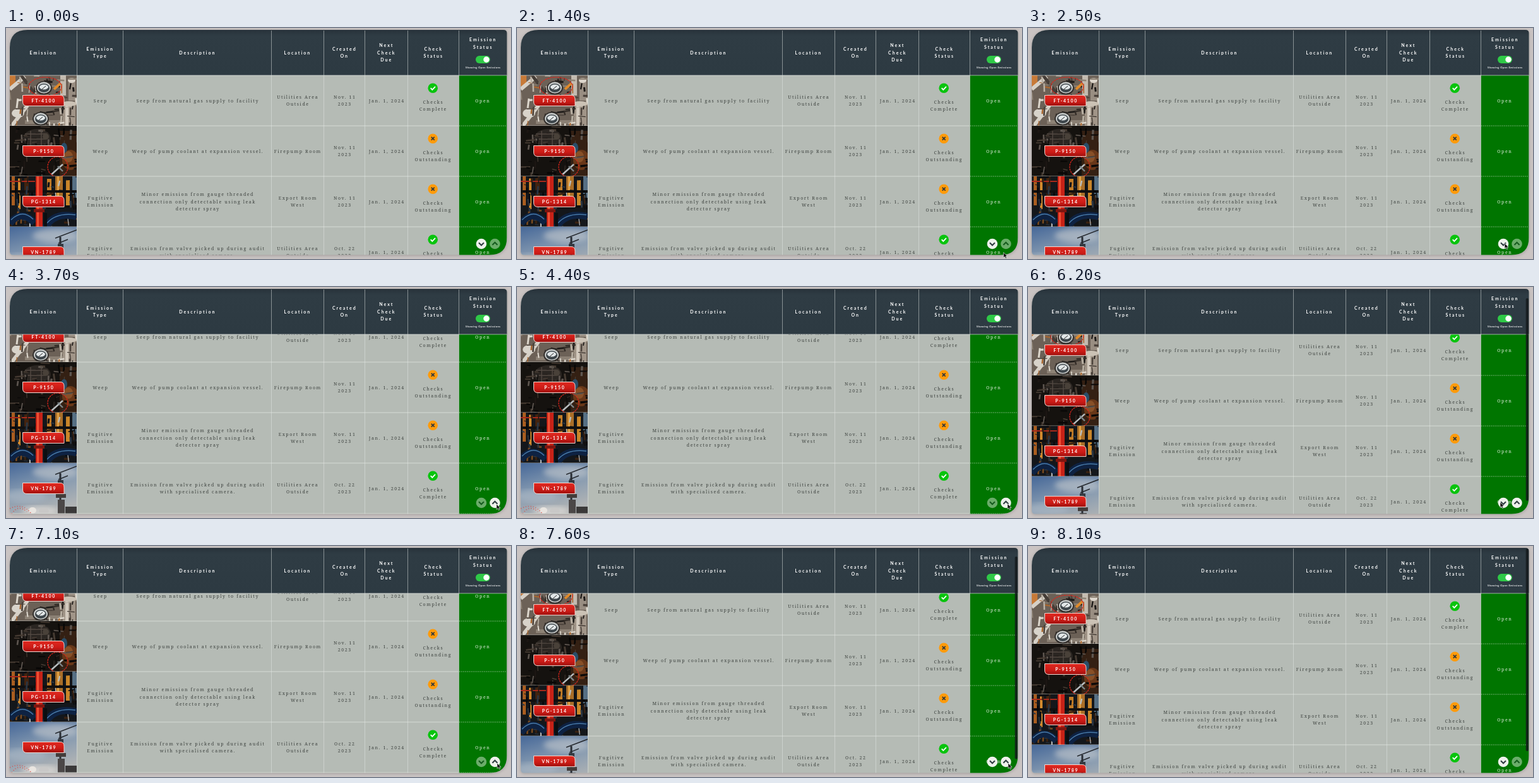
An HTML page for the animation above (8200 ms loop, 800 by 366 pixels).

```html
<!DOCTYPE html>
<html lang="en">
<head>
<meta charset="utf-8">
<title>Emissions table</title>
<style>
html, body { margin: 0; width: 100%; height: 100%; overflow: hidden; background: #cac4c3; }
svg { display: block; width: 100vw; height: 100vh; }
text { text-anchor: middle; }
.head { font: 700 7px Lato, sans-serif; letter-spacing: 2px; fill: #fff; }
.hint { font: 700 4px Lato, sans-serif; letter-spacing: .5px; fill: #fff; }
.cell { font: 7px "Noto Serif", serif; letter-spacing: 1.6px; fill: #3d423f; }
.open { fill: #e3efe0; }
.tag { font: 700 7px Lato, sans-serif; letter-spacing: 1.7px; fill: #fff; }
</style>
</head>
<body>
<svg id="stage" viewBox="0 0 800 366" preserveAspectRatio="none"></svg>
<script>
const LOOP = 8200, MAX = 36, TOP = 75, ROW = 80;
const edges = [112.5, 185.5, 420.5, 503.5, 568.5, 636.5, 717.5];
const centers = [59, 149, 303, 461.5, 536, 602.5, 677, 755.5];
const heads = ['Emission', 'Emission|Type', 'Description', 'Location', 'Created|On', 'Next|Check|Due', 'Check|Status'];
const rows = [
  ['FT-4100', 'Seep', 'Seep from natural gas supply to facility', 'Utilities Area|Outside', 'Nov. 11|2023', true],
  ['P-9150', 'Weep', 'Weep of pump coolant at expansion vessel.', 'Firepump Room', 'Nov. 11|2023', false],
  ['PG-1314', 'Fugitive|Emission', 'Minor emission from gauge threaded|connection only detectable using leak|detector spray', 'Export Room|West', 'Nov. 11|2023', false],
  ['VN-1789', 'Fugitive|Emission', 'Emission from valve picked up during audit|with specialised camera.', 'Utilities Area|Outside', 'Oct. 22|2023', true]
];

const rect = (x, y, w, h, fill, more = '') => `<rect x="${x}" y="${y}" width="${w}" height="${h}" fill="${fill}" ${more}/>`;
const oval = (x, y, rx, ry, fill, more = '') => `<ellipse cx="${x}" cy="${y}" rx="${rx}" ry="${ry}" fill="${fill}" ${more}/>`;
const disc = (x, y, r, fill, more) => oval(x, y, r, r, fill, more);
const line = (d, color, w, more = '') => `<path d="${d}" fill="none" stroke="${color}" stroke-width="${w}" ${more}/>`;
const text = (str, x, y, cls) => str.split('|').map((s, i, all) =>
  `<text class="${cls}" x="${x + .8}" y="${y + 2.5 + (i - (all.length - 1) / 2) * 11.6}">${s}</text>`).join('');
const grad = (id, stops, dir = 'x2="0" y2="1"') => `<linearGradient id="${id}" ${dir}>` +
  stops.map(([at, c]) => `<stop offset="${at}" stop-color="${c}"/>`).join('') + '</linearGradient>';
const mark = (x, y, rx, ry) => oval(x, y, rx, ry, 'none', 'stroke="#e0241a" stroke-width="1.2" stroke-dasharray="3 1"');

function random(seed) {
  return () => (seed = (seed * 16807) % 2147483647) / 2147483647;
}

// Loose strokes that give the machinery its cluttered texture
function clutter(seed, count, colors) {
  const rnd = random(seed);
  let out = '';
  for (let i = 0; i < count; i++) {
    const x = rnd() * 106, y = rnd() * 80, len = 4 + rnd() * 12, flat = rnd() < .45;
    const dx = flat ? len : rnd() * 4 - 2, dy = flat ? rnd() * 4 - 2 : len;
    const color = colors[Math.floor(rnd() * colors.length)];
    out += line(`M${x.toFixed(1)} ${y.toFixed(1)}l${dx.toFixed(1)} ${dy.toFixed(1)}`, color, (1 + rnd() * 2.4).toFixed(1));
  }
  return out;
}

function gauge(x, y, r) {
  return oval(x, y, r + 1, r - 1, '#35312e') + oval(x, y - .5, r - 1, r - 3, '#c9cccb') +
    oval(x, y, r - 3, r - 5, '#3e464b') + oval(x, y - 1.5, r - 5, r - 8, '#e2e7e8') +
    line(`M${x - 3} ${y + 2}l6 -5`, '#222', 1);
}

const photos = [
  () => rect(0, 0, 106, 80, '#6c6157') + rect(0, 0, 9, 17, '#c77a38') +
    line('M0 22L24 2M3 80L28 48', '#d6d0c6', 6) + line('M18 0L40 30', '#453d37', 5) +
    rect(80, 0, 9, 32, '#c3bbb0') + rect(93, 6, 11, 34, '#998e82') + oval(98, 8, 6, 4, '#ddd6cc') +
    rect(84, 44, 20, 36, '#a19588') + rect(88, 44, 5, 36, '#d3cabe') +
    oval(13, 60, 10, 7, '#d8d3ca') + line('M24 74H84', '#8b8074', 6) +
    clutter(71, 85, ['#332c27', '#b9b0a3', '#4b423b', '#8f8476', '#dcd6cc', '#1d1a18', '#a9672f']) +
    oval(94, 45, 12, 4, '#cbc2b5') + line('M70 22l10 -9', '#e08a2a', 4) +
    gauge(54, 20, 12) + gauge(49, 69, 12) + mark(56, 18, 26, 15),
  () => rect(0, 0, 106, 80, '#15120f') + rect(79, 8, 27, 72, '#3c2314', 'opacity=".8"') +
    oval(43, 20, 22, 15, '#2b2622') + oval(96, 54, 13, 16, '#683718') + oval(93, 49, 7, 9, '#885027') +
    clutter(29, 70, ['#38302a', '#080706', '#463b32', '#1c1613', '#5e5650', '#0b0908']) +
    line('M24 13h34M28 21h28M33 8v26M50 6v27', '#534a43', 1.4) +
    disc(57, 17, 5, '#494139') + oval(86, 35, 5, 8, '#2a4d68') +
    line('M66 77L84 61', '#b9bec0', 2.4) + line('M76 64l8 8', '#7c8588', 2.4) + mark(76, 65, 16, 16),
  () => rect(0, 0, 106, 80, '#14171b') +
    rect(3, 0, 5, 46, '#a95d20') + rect(13, 2, 4, 50, '#d38a2d') + rect(23, 0, 7, 38, '#43230f') +
    rect(59, 4, 7, 35, '#c47d27') + rect(72, 0, 12, 38, '#a96e28') + rect(75, 0, 3, 38, '#e0a044') +
    rect(89, 5, 6, 45, '#c98529') + rect(99, 0, 7, 34, '#566f83') +
    line('M0 24H106M26 48H106', '#120f0e', 4) + line('M0 8H40', '#a82a1c', 2) +
    clutter(53, 70, ['#2b3643', '#08090b', '#7c4c20', '#121519', '#3a2212', '#0d0f12', '#b8bdbf']) +
    line('M0 75Q18 51 39 74M56 82Q70 55 106 64', '#0e2242', 11) +
    line('M2 69Q20 51 37 68M59 74Q74 57 104 61', '#4779a8', 1.5) +
    rect(41, 0, 11, 80, '#c62217') + rect(43, 0, 3, 80, '#ef5135') +
    rect(38, 52, 17, 5, '#7d1610') + rect(54, 58, 5, 22, '#0b0e11'),
  () => rect(0, 0, 106, 80, 'url(#sky)') +
    oval(72, 14, 36, 11, '#c6cacd', 'opacity=".6" filter="url(#blur)"') +
    oval(24, 52, 34, 10, '#b4bfca', 'opacity=".5" filter="url(#blur)"') +
    oval(48, 76, 29, 8, '#dad8d5', 'opacity=".8" filter="url(#blur)"') +
    line('M80 16V80', '#2a2f36', 3) + line('M72 18L106 5M77 26L92 20', '#272b31', 1.6) +
    rect(76, 27, 9, 11, '#343a42') + rect(73, 49, 16, 6, '#433d3b') +
    rect(76, 58, 11, 22, '#4b4747') + rect(88, 69, 18, 11, '#3b3939') +
    oval(36, 75, 6, 5, '#e9e5e0') + oval(54, 76, 8, 5, '#c9c8c7') +
    line('M0 72Q20 62 34 80M3 80Q14 65 27 77', '#db4a43', 1.5, 'stroke-dasharray="1 3"')
];

function status(x, y, done) {
  return disc(x, y, 7.8, done ? '#08c40d' : '#ff9b0b') + (done
    ? line(`M${x - 3.5} ${y}l2.6 2.7l4.7 -5`, '#fff', 1.8)
    : line(`M${x - 2.5} ${y - 2.5}l5 5m0 -5l-5 5`, '#33393b', 1.8));
}

function tableRow([tag, type, desc, place, date, done], i) {
  const y = TOP + i * ROW, mid = y + 40;
  return `<svg x="6" y="${y}" width="106" height="80">${photos[i]()}</svg>` +
    `<path d="M28 ${mid - 8.5}H86Q92 ${mid - 8.5} 92 ${mid - 2}V${mid + 8.5}H33Q26.5 ${mid + 8.5} 26.5 ${mid + 2}V${mid - 8.5}Z" fill="url(#red)" stroke="#f3d8d2"/>` +
    text(tag, centers[0], mid, 'tag') +
    [type, desc, place, date, 'Jan. 1, 2024'].map((s, k) => text(s, centers[k + 1], mid, 'cell')).join('') +
    status(676.2, y + 20.2, done) + text(done ? 'Checks|Complete' : 'Checks|Outstanding', 676, y + 48, 'cell') +
    text('Open', 754.5, mid, 'cell open') +
    line(`M6 ${y + 80}H717`, '#e0e4df', 1, 'opacity=".75"') +
    line(`M718 ${y + 80}H793`, '#b7d3b4', 1, 'opacity=".6" stroke-dasharray="2 1"');
}

const button = (id, x, d) => `<g id="${id}">${disc(x, 342, 8.3, '#eef1ec')}${line(d, '#2d3a40', 2)}</g>`;
const frame = 'M34 3H788Q793.5 3 793.5 8V332Q793.5 359.5 766 359.5H11Q6 359.5 6 354V31Q6 3 34 3Z';
const columns = edges.map(x => `M${x} 4V360`).join('');

stage.innerHTML = `<defs>
  ${grad('sky', [[0, '#4a6b9a'], [.5, '#8499b0'], [1, '#b0b3b4']], 'x1=".1" x2=".5" y2="1"')}
  ${grad('red', [[0, '#e02a21'], [.6, '#cc1b16'], [1, '#9c100e']])}
  ${grad('bar', [[0, '#27323a'], [.13, '#2f3c44'], [1, '#2d3a42']])}
  <filter id="blur"><feGaussianBlur stdDeviation="4"/></filter>
  <filter id="soft"><feGaussianBlur stdDeviation="2.5"/></filter>
  <clipPath id="clip"><path d="${frame}"/></clipPath></defs>
  ${rect(0, 0, 800, 366, '#cac4c3')}
  <path d="${frame}" fill="#817b7b" opacity=".6" transform="translate(0 1)" filter="url(#soft)"/>
  <g clip-path="url(#clip)">
    ${rect(6, 3, 788, 357, '#b5bbb5')}${rect(717.5, TOP, 76, 290, '#007500')}
    <g id="rows">${rows.map(tableRow).join('')}</g>
    ${rect(6, 3, 788, 72, 'url(#bar)')}
    ${line(columns, '#e4e8e5', 1, 'opacity=".5"')}
    ${line('M6 75H794', '#e0e4e1', 1, 'opacity=".65"')}
    ${heads.map((s, i) => text(s, centers[i] - .5, 39, 'head')).join('')}
    ${text('Emission|Status', 755, 24.4, 'head')}
    ${rect(744, 44, 23, 12, '#2fc947', 'rx="6"')}${disc(761, 50, 4.7, '#fff')}
    ${text('Showing Open Emissions', 755, 61.3, 'hint')}
    <rect id="thumb" x="788.7" width="4.3" height="321" rx="2.1" fill="#151b1d"/>
  </g>
  ${button('down', 753, 'M749 340.3l4 4l4 -4')}${button('up', 774.5, 'M770.5 343.7l4 -4l4 4')}
  <path id="cursor" d="M0 0V8.5L2 6.7L3.4 9.6L5 8.9L3.6 6.1H6.2Z" fill="#111" stroke="#fff" stroke-width=".6"/>`;

const el = id => document.getElementById(id);
const clamp = v => Math.max(0, Math.min(1, v));
const ease = p => p * p * (3 - 2 * p);
const span = (t, a, b) => ease(clamp((t - a) / (b - a)));

// Clicks alternate between scrolling down and up
const scrolls = [2720, 4500, 6085, 7450], TIME = 260;
const path = [[1000, 782, 366], [1900, 755, 341], [3000, 755, 341], [3600, 777, 344], [5050, 777, 343],
  [5700, 748, 341], [6300, 748, 341], [6900, 778, 344], [7720, 778, 344], [8050, 796, 366]];

function draw(t) {
  let pos = 0, bar = 0;
  scrolls.forEach((s, i) => {
    pos += (i % 2 ? -1 : 1) * span(t, s, s + TIME);
    if (t > s) bar = Math.max(bar, 1 - span(t, s + TIME + 400, s + TIME + 650));
  });
  el('rows').setAttribute('transform', `translate(0 ${(-pos * MAX).toFixed(2)})`);
  el('thumb').setAttribute('y', 4 + pos * 33);
  el('thumb').setAttribute('opacity', bar * .85);
  el('up').setAttribute('opacity', .45 + .55 * clamp(pos / .35));
  el('down').setAttribute('opacity', .45 + .55 * clamp((1 - pos) / .4));

  const k = path.findIndex(p => p[0] > t);
  el('cursor').setAttribute('visibility', k > 0 ? 'visible' : 'hidden');
  if (k > 0) {
    const [t0, x0, y0] = path[k - 1], [t1, x1, y1] = path[k], p = span(t, t0, t1);
    el('cursor').setAttribute('transform', `translate(${x0 + (x1 - x0) * p} ${y0 + (y1 - y0) * p})`);
  }
}

const start = performance.now();
function tick(now) {
  const t = Math.max(0, now - start) % LOOP;
  draw(Math.floor(t / 100) * 100);
  requestAnimationFrame(tick);
}
draw(0);
requestAnimationFrame(tick);
</script>
</body>
</html>
```
